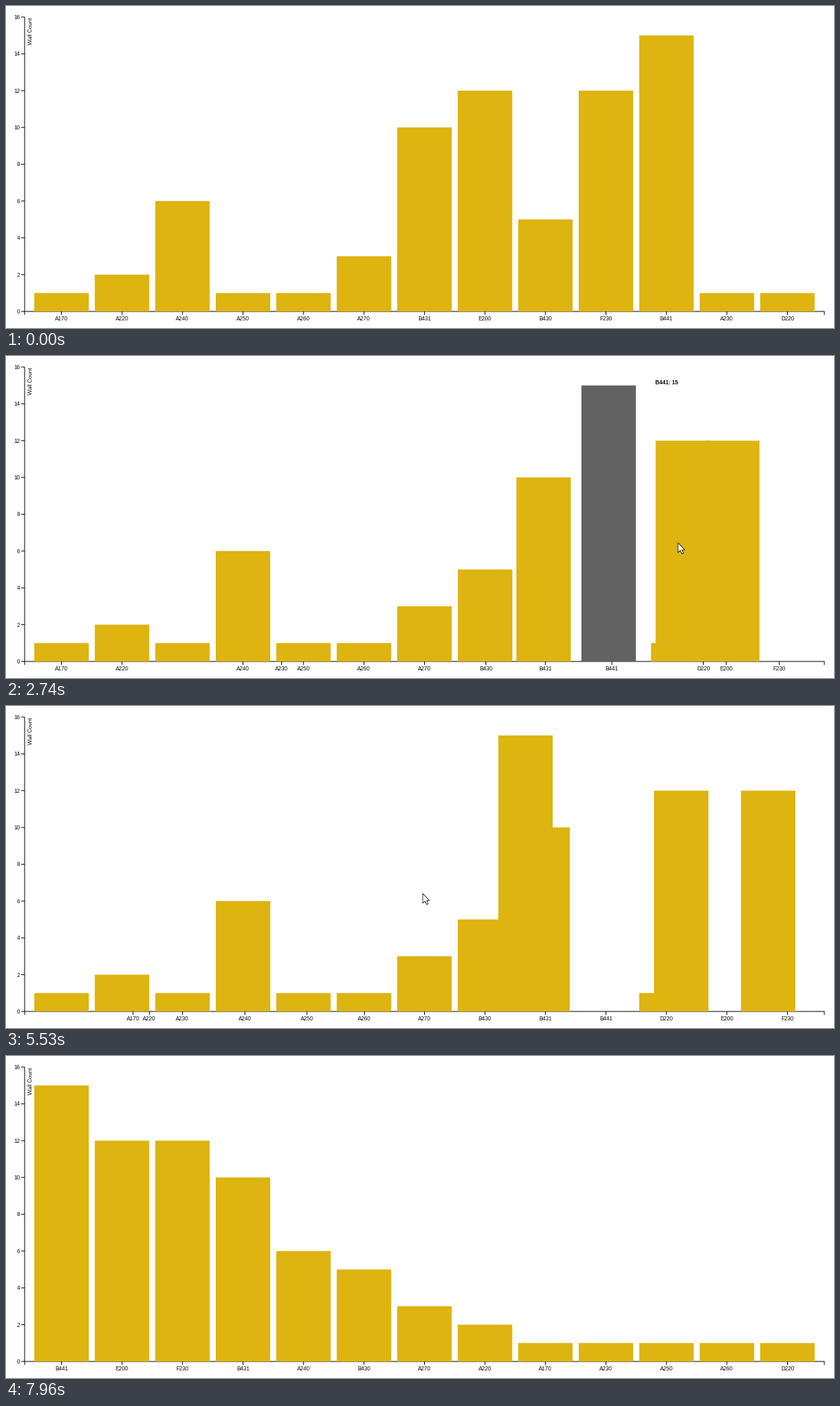
A matplotlib script for the animation above (8920 ms loop, 1200 by 467 pixels).

```python
import matplotlib.pyplot as plt
from matplotlib.animation import FuncAnimation
from matplotlib.patches import Polygon, Rectangle

W, H = 1200, 467
LOOP, STEP, TICK = 8920, 20, 30   # ms; the picture advances every TICK
PX = 0.72                         # one pixel in points at 100 dpi
GOLD, GRAY = "#ddb410", "#626262"
X0, X1, Y0, Y1 = 27, 1186, 443, 16
LEFT, BAND = 41, 87.67
BAR = 0.9 * BAND

COUNTS = dict(A170=1, A220=2, A240=6, A250=1, A260=1, A270=3, B431=10,
              E200=12, B430=5, F230=12, B441=15, A230=1, D220=1)
NAMES = list(COUNTS)
BY_NAME = sorted(NAMES)
BY_COUNT = sorted(BY_NAME, key=lambda n: -COUNTS[n])

# start in ms, playback speed, order before, order after
SORTS = [(1857, 1.169, NAMES, BY_NAME), (5307, 1.12, BY_NAME, BY_COUNT)]
DURATION, DELAY = 750, 50

# pointer visits: order used for hovering, key points (ms, x, y)
VISITS = [
    (NAMES, [(630, 605, 441), (930, 690, 300), (1240, 842, 441)]),
    (NAMES, [(2100, 846, 441), (2260, 961, 251), (2680, 974, 271),
             (3480, 974, 271)]),
    (BY_NAME, [(3480, 974, 271), (4350, 384, 331), (4590, 297.5, 343),
               (4860, 345, 426)]),
    ([], [(5320, 430, 441), (5530, 604, 272), (5920, 1058, 306),
          (6160, 799, 264), (7690, 799, 264), (7960, 1180, 439)]),
]
LAG = 80                          # hover trails the pointer


def cubic(t):
    t = min(max(t, 0), 1)
    return 4 * t ** 3 if t < 0.5 else 1 - 4 * (1 - t) ** 3


def smooth(t):
    return t * t * (3 - 2 * t)


def level(count):
    return Y0 + (Y1 - Y0) * count / 16


def slot(rank):
    return LEFT + BAND * rank


def bar_x(name, ms, queue=None):
    """Left edge of a bar; queue gives the stagger order."""
    for start, speed, old, new in reversed(SORTS):
        if ms >= start:
            wait = DELAY * (queue or new).index(name)
            k = cubic(((ms - start) * speed - wait) / DURATION)
            a, b = old.index(name), new.index(name)
            return slot(a + (b - a) * k)
    return slot(NAMES.index(name))


def visit_at(ms):
    return next((v for v in VISITS if v[1][0][0] <= ms < v[1][-1][0]), None)


def point_on(path, ms):
    for (t0, x0, y0), (t1, x1, y1) in zip(path, path[1:]):
        if ms < t1:
            k = smooth(max(ms - t0, 0) / (t1 - t0))
            return x0 + (x1 - x0) * k, y0 + (y1 - y0) * k


def hit(order, x, y):
    for rank, name in enumerate(order):
        if 0 <= x - slot(rank) <= BAR and level(COUNTS[name]) <= y <= Y0:
            return name
    return None


plt.rcParams.update({"font.family": "Liberation Sans", "font.size": 8 * PX,
                     "text.hinting": "default"})

fig = plt.figure(figsize=(W / 100, H / 100), dpi=100, facecolor="white")
ax = fig.add_axes([0, 0, 1, 1])
ax.set_xlim(0, W)
ax.set_ylim(H, 0)
ax.axis("off")


def rule(xs, ys):
    return ax.plot(xs, ys, color="black", lw=PX, snap=False,
                   solid_capstyle="butt", solid_joinstyle="miter", zorder=1)[0]


rule([X0 - 5, X0, X0, X0 - 5], [Y1, Y1, Y0, Y0])
rule([X0, X0, X1, X1], [Y0 + 5, Y0, Y0, Y0 + 5])
for v in range(0, 17, 2):
    y = level(v)
    if 0 < v < 16:
        rule([X0 - 5, X0], [y, y])
    ax.text(20.5, y + 3, str(v), ha="right", va="baseline")
ax.text(38, Y1, "Wall Count", rotation=90, rotation_mode="anchor",
        ha="right", va="baseline")

bars, ticks, labels = {}, {}, {}
for n in NAMES:
    y = level(COUNTS[n])
    bars[n] = ax.add_patch(Rectangle((0, y), BAR, Y0 - y, lw=0, snap=False))
    ticks[n] = rule([0, 0], [Y0, Y0 + 5])
    labels[n] = ax.text(0, 456, n, ha="center", va="baseline", zorder=4)

tip = ax.text(0, 0, "", weight="bold", ha="center", va="baseline", zorder=5)

ARROW = [(0, 0), (0, 14), (3.2, 11), (5.6, 16), (7.8, 15), (5.5, 10.2), (9.8, 10.2)]
arrow = ax.add_patch(Polygon(ARROW, closed=True, fc="white", ec="black",
                             lw=0.8 * PX, joinstyle="miter", zorder=6))


def draw(i):
    ms = i * STEP // TICK * TICK + 10
    visit = visit_at(ms)
    lit = None
    if visit:
        order, path = visit
        x, y = point_on(path, ms)
        arrow.set_xy([(x + dx, y + dy) for dx, dy in ARROW])
        lit = hit(order, *point_on(path, ms - LAG))
    arrow.set_visible(visit is not None)

    tip.set_visible(lit is not None)
    if lit:
        tip.set_text(f"{lit}: {COUNTS[lit]}")
        tip.set_position((slot(order.index(lit)) + BAR / 2,
                          level(COUNTS[lit]) - 1.6))

    stack = next((s[3] for s in reversed(SORTS) if ms >= s[0]), NAMES)
    for n in NAMES:
        bars[n].set_x(bar_x(n, ms))
        bars[n].set_zorder(2 + stack.index(n) / 100)
        bars[n].set_facecolor(GRAY if n == lit else GOLD)
        mid = bar_x(n, ms, NAMES) + BAR / 2
        ticks[n].set_xdata([mid, mid])
        labels[n].set_x(mid)
    return []


anim = FuncAnimation(fig, draw, frames=LOOP // STEP, interval=STEP,
                     repeat=True, repeat_delay=0)
plt.show()
```
